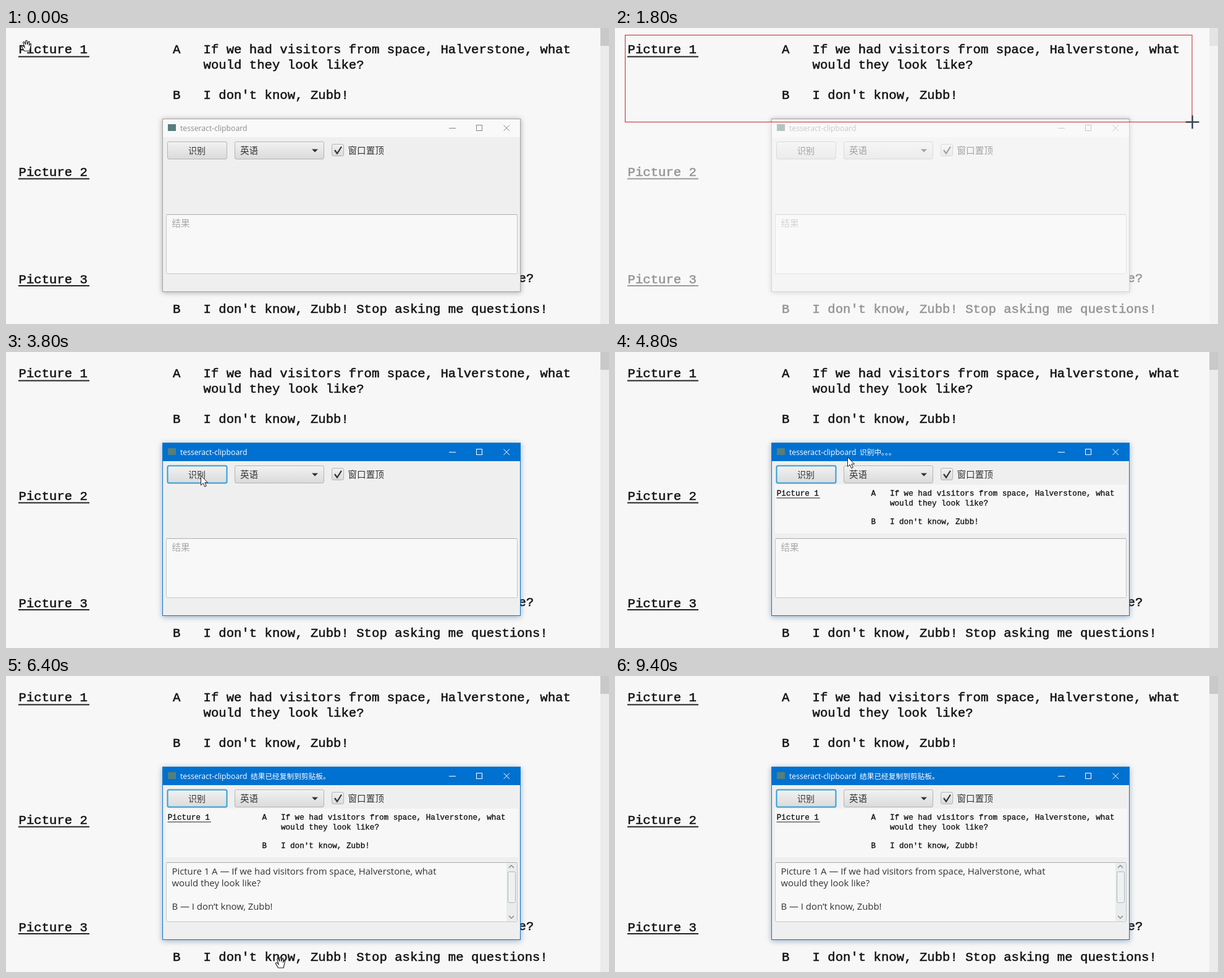
Recreate the animation shown at these times as an HTML page. Size 976 by 480 pixels, loop 9.6 s.

```html
<!DOCTYPE html>
<html lang="en">
<head>
<meta charset="utf-8">
<title>tesseract-clipboard</title>
<style>
  html, body { margin: 0; width: 100%; height: 100%; overflow: hidden; background: #f7f7f7; }
  svg { display: block; width: 976px; height: 480px; }
  text { white-space: pre; }
  .doc { font: 20.65px "Liberation Mono", monospace; fill: #141414; stroke: #141414; stroke-width: .55px; }
  .rule { stroke: #222; stroke-width: 2; }
  .ui { font: 14.6px "Noto Sans CJK SC", "Noto Sans CJK", sans-serif; fill: #333; }
  .ui .small { font-size: 14px; }
  .latin { font: 14.9px "Open Sans", sans-serif; fill: #333; }
  .title { font: 12.2px "Open Sans", "Noto Sans CJK SC", "Noto Sans CJK", sans-serif; fill: #8d8d8d; }
  .status { font: 11.7px "Noto Sans CJK SC", "Noto Sans CJK", sans-serif; fill: #fff; }
  .caps { fill: none; stroke: #858585; }
  #frame { stroke: #a4a4a4; filter: drop-shadow(0 1px 4px rgba(0, 0, 0, .32)); }
  #bar { fill: #f9f9f9; }
  #btn { stroke: #b4b4b4; }
  .on #frame { stroke: #0f74c6; filter: drop-shadow(0 2px 5px rgba(30, 80, 130, .42)); }
  .on #bar { fill: #0071d0; }
  .on .title { fill: #fff; }
  .on .caps { stroke: #fff; }
  .on #btn { stroke: #2f9fd6; stroke-width: 2; }
  .hover #min { stroke: #222; }
</style>
</head>
<body>
<svg viewBox="0 0 976 480">
  <defs>
    <linearGradient id="face" x2="0" y2="1">
      <stop offset="0" stop-color="#f2f2f2"/><stop offset="1" stop-color="#dadada"/>
    </linearGradient>
    <clipPath id="crop"><rect x="16" y="11" width="930" height="129"/></clipPath>
  </defs>
  <rect width="976" height="480" fill="#f7f7f7"/>
  <g id="page" class="doc"></g>
  <rect x="962" width="14" height="480" fill="#ebebeb"/>
  <rect x="962" width="14" height="29" fill="#c9c9c9"/>

  <g id="win">
    <rect id="frame" x="253.5" y="147.5" width="579" height="280" fill="#efefef"/>
    <rect id="bar" x="254" y="148" width="578" height="29"/>
    <rect x="262" y="156" width="13" height="11" fill="#557f7c"/>
    <text class="title" x="282" y="166.5">tesseract-clipboard</text>
    <text class="status" id="status" x="396" y="166.5"></text>
    <g class="caps">
      <path id="min" d="M717 162.5h11"/>
      <rect x="761.5" y="157.5" width="9" height="9"/>
      <path d="M805.5 157.5l9.5 9.5m0-9.5l-9.5 9.5"/>
    </g>
    <g fill="url(#face)" stroke="#b4b4b4">
      <rect id="btn" x="261.5" y="184.5" width="96" height="28" rx="2.5"/>
      <rect x="370.5" y="184.5" width="144" height="28" rx="2.5"/>
      <rect x="527.5" y="188.5" width="19" height="19" rx="2.5"/>
    </g>
    <path d="M495 196.5h10l-5 5z" fill="#333"/>
    <path d="M532 198l4 5.5l7-11" fill="none" stroke="#333" stroke-width="2.2"/>
    <g class="ui">
      <text class="small" x="295" y="204">识别</text>
      <text x="379" y="204">英语</text>
      <text x="553.5" y="203.5">窗口置顶</text>
    </g>
    <g id="shot">
      <rect x="259" y="215" width="570" height="79" fill="#f7f7f7"/>
      <g transform="translate(259 215) scale(.6125) translate(-16 -11)">
        <use href="#page" clip-path="url(#crop)"/>
      </g>
    </g>
    <rect x="259.5" y="302.5" width="568" height="96" rx="2" fill="#f8f8f8" stroke="#c6c6c6"/>
    <path d="M260 302.5h567" stroke="#adadad"/>
    <text id="hint" class="ui" x="268.5" y="322" style="fill:#a8a8a8">结果</text>
    <g id="result" class="latin">
      <text x="268.5" y="322">Picture 1 A — If we had visitors from space, Halverstone, what</text>
      <text x="268.5" y="341">would they look like?</text>
      <text x="268.5" y="379">B — I don’t know, Zubb!</text>
      <rect x="810" y="303.5" width="17" height="94" fill="#e9ecec"/>
      <rect x="812.5" y="317.5" width="12" height="50" rx="2" fill="#eef1f2" stroke="#aeb8bc"/>
      <path d="M814 311l4-4l4 4M814 389l4 4l4-4" fill="none" stroke="#777" stroke-width="1.2"/>
    </g>
  </g>

  <path id="dim" fill="#f9f9f9" fill-rule="evenodd"/>
  <rect id="sel" x="16.5" y="11.5" fill="none" stroke="#c4262e"/>

  <g id="arrow"><path d="M.5 .5v15.5l3.6-3.3l2.6 5.8l2.6-1.2l-2.6-5.5h4.9z" fill="#fff" stroke="#222"/></g>
  <g id="hand">
    <path transform="scale(1.15)" d="M-3 8l-3.5-6q0-2 2-1l2 2l-2-7q.5-2 2 0l1.5 3l0-5q1-2 2 0l.5 5l1.5-4q1.5-1 1.5 1l-.5 4l1.5-2q1.5-.5 1 1l-2 9z"
      fill="#fff" stroke="#222"/>
  </g>
  <g id="cross" fill="none">
    <path d="M-11 0h22M0-11v22" stroke="#70757f" stroke-width="3"/>
    <path d="M-10 0h20M0-10v20" stroke="#2c3340"/>
  </g>
</svg>
<script>
const $ = id => document.getElementById(id);
const STEP = 200, LOOP = 9600;

const lines = [
  [20.5, 41, 'Picture 1'], [20.5, 239.5, 'Picture 2'], [20.5, 413.5, 'Picture 3'],
  [270, 41, 'A'], [319.5, 41, 'If we had visitors from space, Halverstone, what'],
  [319.5, 66, 'would they look like?'],
  [270, 115, 'B'], [319.5, 115, "I don't know, Zubb!"],
  [829.5, 412, 'e?'],
  [270, 461.5, 'B'], [319.5, 461.5, "I don't know, Zubb! Stop asking me questions!"]
];
$('page').innerHTML =
  lines.map(([x, y, s]) => `<text x="${x}" y="${y}">${s}</text>`).join('') +
  [46.5, 244.5, 418].map(y => `<path class="rule" d="M20 ${y}h115"/>`).join('');

// time, pointer shape, x, y
const moves = [
  [0, 'hand', 33, 28], [200, ''],
  [1000, 'cross', 150, 48], [1200, 'cross', 400, 92], [1400, 'cross', 690, 136],
  [1600, 'cross', 890, 156], [1800, 'cross', 934, 152], [2000, 'cross', 946, 146],
  [2200, 'cross', 946, 142], [2400, 'cross', 946, 140],
  [2800, 'arrow', 657, 185], [3000, 'arrow', 560, 190], [3200, 'arrow', 430, 197],
  [3400, 'arrow', 335, 200], [3600, 'arrow', 315, 200],
  [4000, 'arrow', 318, 199], [4200, 'arrow', 332, 193], [4400, 'arrow', 352, 183],
  [4600, 'arrow', 370, 174], [4800, 'arrow', 376, 170], [5000, 'arrow', 378, 173],
  [5200, 'arrow', 383, 190], [5400, 'arrow', 392, 235], [5600, 'arrow', 404, 295],
  [5800, 'arrow', 418, 355], [6000, 'arrow', 432, 410], [6200, 'hand', 440, 448],
  [6400, 'hand', 444, 464], [6600, 'hand', 445, 474], [6800, '']
];
const CLICK = 3600, READ = 4000, DONE = 5600;

const show = (id, on) => $(id).style.display = on ? '' : 'none';

function draw(t) {
  const [, shape, x, y] = moves.findLast(m => m[0] <= t);
  for (const id of ['arrow', 'hand', 'cross']) show(id, id === shape);
  const cut = shape === 'cross';
  if (shape) {
    const half = cut ? .5 : 0;
    $(shape).setAttribute('transform', `translate(${x + half} ${y + half})`);
  }

  show('sel', cut);
  if (cut) {
    $('sel').setAttribute('width', x - 16.5);
    $('sel').setAttribute('height', y - 11);
  }
  $('dim').setAttribute('d', 'M0 0H976V480H0Z' + (cut ? `M16 11H${x}V${y}H16Z` : ''));
  $('dim').setAttribute('opacity', t < 200 || t >= 2800 ? 0 : t < 400 ? .3 : .56);

  $('win').classList.toggle('on', t >= CLICK);
  $('win').classList.toggle('hover', t >= 2800 && t < 3000);
  show('shot', t >= READ);
  show('result', t >= DONE);
  show('hint', t < DONE);
  $('status').textContent = t < READ ? '' : t < DONE ? '识别中。。。' : '结果已经复制到剪贴板。';
}

let last = -1;
function tick() {
  const t = Math.floor(performance.now() % LOOP / STEP) * STEP;
  if (t !== last) draw(last = t);
  requestAnimationFrame(tick);
}
tick();
</script>
</body>
</html>
```
